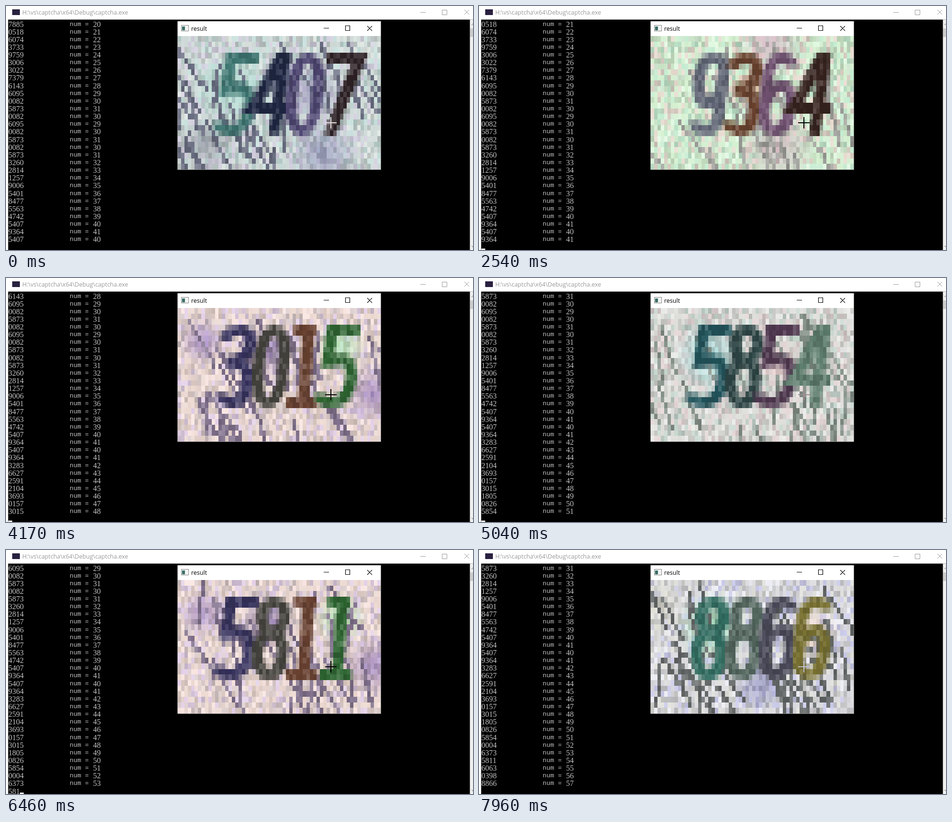
An HTML page with a canvas that plays this animation: 976 px wide and 512 px high, repeating every 8000 ms.

```html
<!DOCTYPE html>
<html lang="en">
<head>
<meta charset="utf-8">
<title>captcha</title>
<style>
  html, body { margin: 0; width: 100%; height: 100%; overflow: hidden; background: #000; }
  #stage { position: relative; width: 976px; height: 512px; overflow: hidden; background: #000; }
  svg, canvas, pre, #caret { position: absolute; margin: 0; }
  svg { left: 0; top: 0; }
  svg text { font: 12.5px "Open Sans", "Noto Sans", sans-serif; }
  canvas { left: 359px; top: 63px; }
  pre { top: 30.5px; color: #c4c4c4; font: 16px/16.14px "Liberation Serif", serif; }
  #label { left: 133px; font: 13.33px/16.14px "Liberation Mono", monospace; }
  #codes { left: 5px; }
  #nums { left: 182px; }
  #caret { top: 509px; width: 8px; height: 3px; background: #fff; }
</style>
</head>
<body>
<div id="stage">
  <pre id="codes"></pre><pre id="label"></pre><pre id="nums"></pre>
  <div id="caret"></div>
  <svg width="976" height="512" fill="none">
    <path fill="#fff" d="M0 0H976V28.5H4.5V512H0Z"/>
    <rect x="13" y="7" width="16" height="12" fill="#2a2040"/>
    <text x="34" y="18" fill="#999">H:\vs\captcha\x64\Debug\captcha.exe</text>
    <path stroke="#999" d="M866 13.5h11M911.5 8.5h10v10h-10zM958 8l10 10m0-10l-10 10"/>
    <path fill="#f0f0f0" d="M969.5 28.5H976V512h-6.5z"/>
    <path fill="#cdcdcd" d="M970 47h6v18h-6z"/>
    <path stroke="#606060" d="M973 40l3-3M973 503l3 3"/>
    <path fill="#fff" d="M358 32h426v31h-426z"/>
    <path stroke="#808080" d="M358.5 32V343.5H783.5V32M358 63.5H783"/>
    <rect x="366.5" y="40.5" width="15" height="12" fill="#f4f4f4" stroke="#848484"/>
    <path fill="#387068" d="M368 43h6v8h-6z"/>
    <text x="387" y="51.5" fill="#000">result</text>
    <path stroke="#000" stroke-width="1.2" d="M664 46.5h11M709.5 41.5h9v10h-9zM755 42l10 10m0-10l-10 10"/>
  </svg>
  <canvas id="view" width="424" height="280"></canvas>
</div>
<script>
const LOOP = 8000, ROWS = 29, DIGIT_MS = 40, LINE_MS = 190;
const COLS = 60, LINES = 24, W = 424, H = 280;
const $ = id => document.getElementById(id);

const past = `7885 0518 6074 3733 9759 3006 3022 7379 6143 6095 0082 5873 0082 6095 0082
  5873 0082 5873 3260 2814 1257 9006 5401 8477 5563 4742 5407 9364 5407`.split(/\s+/);
const next = `9364 3283 6627 2591 2104 3693 0157 3015 1805
  0826 5854 0004 6373 5811 6063 0398 8866`.split(/\s+/);
const codes = [...past, ...next];
const order = [...new Set(codes)];
const numOf = code => 20 + order.indexOf(code);

// Shot 0 is already on screen; the others start at these times.
const starts = [-1000, 540, 2560, 2790, 3020, 3250, 3480, 3710, 3940, 4330,
  4580, 4820, 5300, 5790, 6330, 6820, 7260, 7720];
const lookOf = '014053612503142536';

// Digit centre lines, in a cell 78 wide and 174 high.
const glyphs = [
  'M46 11Q72 11 67 70Q62 163 32 163Q8 163 12 100Q18 11 46 11Z',
  'M16 11H64M48 11L36 163M0 163H66',
  'M14 36Q20 11 46 11Q72 14 68 44Q62 76 8 163H66',
  'M14 34Q18 11 44 11Q68 11 67 38Q64 78 18 78Q64 76 61 112Q58 163 30 163Q6 163 8 144',
  'M68 0L46 174M62 6L6 112L2 116H78',
  'M84 11H26L17 78Q66 64 66 100Q66 163 28 163Q-2 163 -2 146',
  'M70 30Q70 11 48 11Q24 11 16 60L12 120Q8 163 34 163Q62 160 66 110Q70 70 48 70Q24 70 16 105',
  'M14 11H84L20 174',
  'M46 11Q22 11 20 42Q20 74 42 76Q64 74 68 42Q70 11 46 11M42 76Q12 78 10 120Q10 163 34 163Q62 160 64 115Q64 78 42 76',
  'M6 145Q8 163 30 163Q54 163 58 130L68 34Q70 11 48 11Q20 11 15 60Q12 108 32 106Q56 104 64 75'
].map(d => new Path2D(d));

const look = (ground, ink, line, count, cross, ...patches) =>
  ({ ground: ground.split(' '), ink: ink.split(' '), line, count, cross, patches });

// Patches are x, y, radius, colour.
const looks = [
  look('#ccd8d6 #dce4e0 #c8e0dc #d4d0e0', '#3c7470 #1c2440 #4c4470 #2c2024', '#686c80', 28, '#e8e4e0',
    [110, 110, 80, '#98d8c8'], [215, 90, 45, '#303468'], [285, 120, 60, '#8880b0'],
    [305, 245, 75, '#8c8cb8'], [60, 225, 60, '#8c909c']),
  look('#d4f0d0 #e0f8e0 #c4ecd0 #e8dcd0', '#5f6474 #68402c #705070 #34201c', '#a0a09c', 20, '#000',
    [250, 20, 70, '#d0a8c0'], [265, 230, 80, '#c8a4b4'], [210, 110, 40, '#d89070']),
  look('#ecd8d0 #f8e4e0 #dccccc #e4d0e8', '#34305c #44423c #684030 #2c6430', '#80708c', 26, '#000',
    [50, 70, 50, '#9478c0'], [190, 90, 60, '#8068a8'], [410, 180, 65, '#9074b8'], [340, 80, 55, '#a8f0b4']),
  look('#dcdcd8 #e8e8e6 #e4d6d6 #c8d8d0', '#20545c #2c4444 #503850 #5c7c6c', '#849088', 30, '#a08890',
    [120, 100, 75, '#a0e4e4'], [265, 115, 50, '#ecc8c8'], [340, 110, 55, '#8ca498']),
  look('#d8d4cc #e0dcd8 #ccc8c4 #c4bcc8', '#605c38 #2c2828 #4c2c28 #404460', '#c0bcb8', 8, '#202020',
    [265, 65, 55, '#ecb8a8'], [325, 145, 40, '#b4d8c8'], [240, 240, 60, '#c8c8a8']),
  look('#e0d4d0 #e8c8c8 #ecdcd8 #d4d8cc', '#644858 #5c2450 #20204c #4a6434', '#8c8488', 26, '#000',
    [120, 50, 60, '#e4b0a8'], [255, 120, 85, '#c0b8f0'], [345, 75, 45, '#a0a484']),
  look('#d8d8dc #ccccec #e0e0dc #ececf4', '#306c60 #50645c #484858 #787030', '#646868', 34, '#c0c0d0',
    [10, 60, 80, '#dcdccc'], [130, 100, 80, '#94e4b0'], [335, 110, 60, '#f4d4c0'], [230, 220, 60, '#8888c0'])
];

const low = Object.assign(document.createElement('canvas'), { width: COLS, height: LINES }).getContext('2d');
const view = $('view').getContext('2d');
view.imageSmoothingEnabled = false;

function random(seed) {
  seed = seed * 7919 + 104729;
  return () => (seed = seed * 16807 % 2147483647) / 2147483647;
}

function eachCell(color) {
  low.setTransform(1, 0, 0, 1, 0, 0);
  for (let y = 0; y < LINES; y++) for (let x = 0; x < COLS; x++) {
    low.fillStyle = color();
    low.fillRect(x, y, 1, 1);
  }
}

function drawCaptcha(code, { ground, ink, line, count, cross, patches }, seed) {
  const rnd = random(seed + 1);
  rnd();
  eachCell(() => ground[rnd() < .4 ? 0 : 1 + Math.floor(rnd() * 3)]);

  low.setTransform(COLS / W, 0, 0, LINES / H, 0, 0);
  for (const [x, y, r, color] of patches) {
    const glow = low.createRadialGradient(x, y, 0, x, y, r);
    glow.addColorStop(0, color + 'c0');
    glow.addColorStop(1, color + '00');
    low.fillStyle = glow;
    low.fillRect(0, 0, W, H);
  }

  // Scratches are hard-edged runs of whole cells.
  low.setTransform(1, 0, 0, 1, 0, 0);
  low.fillStyle = line;
  for (let i = 0; i < count; i++) {
    let x = rnd() * 64 - 4, y = rnd() * 22;
    const slope = rnd() * 1.2 - .2;
    for (let k = 0; k < 12; k++) {
      low.fillRect(Math.floor(x), Math.floor(y), 1, 1);
      x += slope;
      y += .7;
    }
  }

  low.lineWidth = 24;
  [...code].forEach((digit, i) => {
    low.setTransform(COLS / W, 0, 0, LINES / H, 12 + 10 * i, 3);
    low.strokeStyle = ink[i];
    low.stroke(glyphs[digit]);
  });

  eachCell(() => `rgba(${rnd() < .5 ? '40,40,40' : '255,255,255'},${rnd() * .2})`);
  view.drawImage(low.canvas, 0, 0, W, H);
  view.fillStyle = cross;
  view.fillRect(308, 181, 24, 2);
  view.fillRect(319, 170, 2, 24);
}

function drawConsole(printed, typed) {
  const rows = codes.slice(0, printed).slice(-ROWS);
  $('codes').textContent = [...rows, typed].join('\n');
  $('label').textContent = rows.map(() => 'num =').join('\n');
  $('nums').textContent = rows.map(numOf).join('\n');
  $('caret').style.left = 5 + 8 * typed.length + 'px';
}

let shownShot, shownText;
function frame() {
  const t = performance.now() % LOOP;
  const shot = starts.findLastIndex(start => t >= start);
  const age = t - starts[shot];
  const done = age >= LINE_MS;
  const code = codes[past.length - 1 + shot];
  const typed = done ? '' : code.slice(0, Math.floor(age / DIGIT_MS));
  const printed = past.length - 1 + shot + done;

  if (shot !== shownShot) drawCaptcha(code, looks[lookOf[shot]], shownShot = shot);
  const text = printed + ':' + typed;
  if (text !== shownText) {
    drawConsole(printed, typed);
    shownText = text;
  }
  const caretOff = t < 540 || (t >= 2000 && t < 2540) || t >= 7930;
  $('caret').style.visibility = caretOff ? 'hidden' : 'visible';
  requestAnimationFrame(frame);
}
frame();
</script>
</body>
</html>
```
